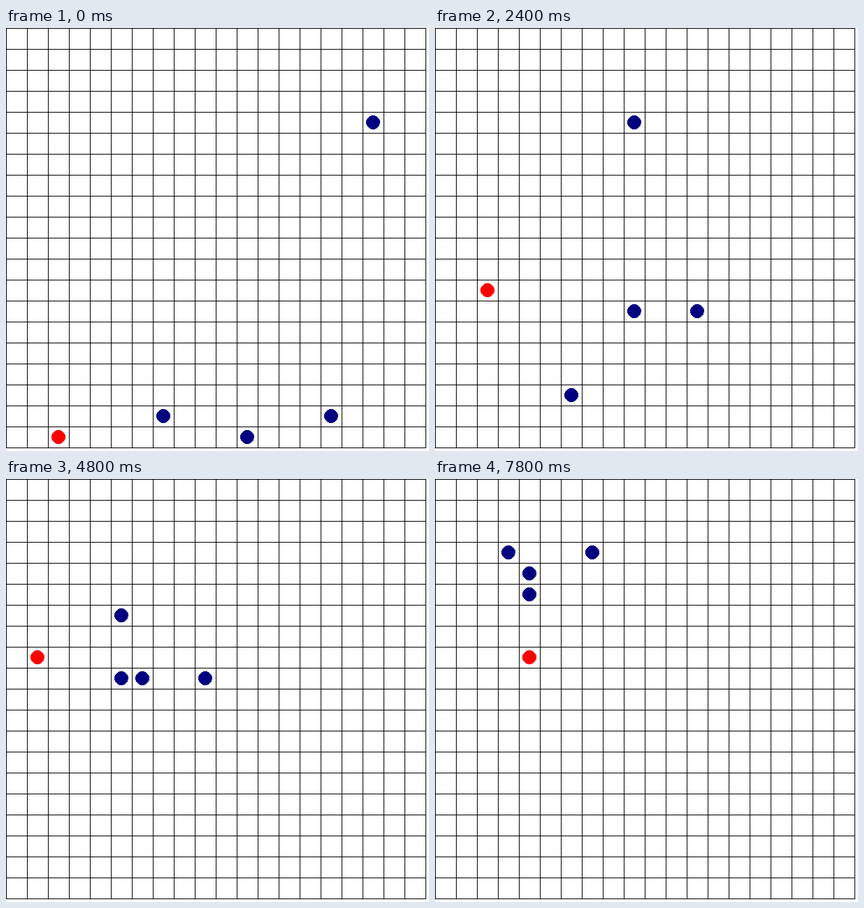
Recreate the animation shown at these times as an HTML page. Size 605 by 605 pixels, loop 8 s.

```html
<!DOCTYPE html>
<html lang="en">
<head>
<meta charset="utf-8">
<title>Grid chase</title>
<style>
  html, body { margin: 0; width: 100%; height: 100%; overflow: hidden; background: #fff; }
  svg { display: block; width: 100vw; height: 100vh; }
</style>
</head>
<body>
<svg viewBox="0 0 605 605" shape-rendering="crispEdges">
  <path id="grid" stroke="#000" fill="none"/>
  <g id="dots"></g>
</svg>
<script>
const CELL = 30, COUNT = 20, STEP = 300, LOOP = 8000;
const MOVES = { L: [-1, 0], R: [1, 0], U: [0, -1], D: [0, 1], '.': [0, 0] };

// Each step is one or more unit moves; the runner can take two at once.
function trail(col, row, steps) {
  const cells = [[col, row]];
  for (const step of steps) {
    for (const move of step) {
      col += MOVES[move][0];
      row += MOVES[move][1];
    }
    cells.push([col, row]);
  }
  return cells;
}

const runner = 'U U U UU U . U . . . . . . U UU UL UU U UU U UR D DD DD DR DR';
const players = [
  { color: '#000080', cells: trail(7, 18, '......ULUUUUUUUUULUUUL....') },
  { color: '#000080', cells: trail(11, 19, 'UUUUULULULULULULUULUUU....') },
  { color: '#000080', cells: trail(15, 18, 'LULULUUUUUUU.LLLLLULUUUUUR') },
  { color: '#000080', cells: trail(17, 4, 'LLLLLLLLLDLDLL..LUUUUL.D..') },
  { color: '#ff0000', cells: trail(2, 19, runner.split(' ')) }
];

let lines = '';
for (let i = 0; i <= COUNT; i++) {
  const p = i * CELL + 0.5;
  lines += `M${p} 0v601M0 ${p}h601`;
}
document.getElementById('grid').setAttribute('d', lines);

const dots = document.getElementById('dots');
for (const player of players) {
  const dot = document.createElementNS('http://www.w3.org/2000/svg', 'circle');
  dot.setAttribute('r', 10);
  dot.setAttribute('fill', player.color);
  player.dot = dots.appendChild(dot);
}

function draw(time) {
  const step = Math.floor((time % LOOP) / STEP);
  for (const { dot, cells } of players) {
    const [col, row] = cells[step];
    dot.setAttribute('cx', (col + 0.5) * CELL);
    dot.setAttribute('cy', (row + 0.5) * CELL);
  }
}

const start = performance.now();
function tick() {
  draw(performance.now() - start);
  requestAnimationFrame(tick);
}
tick();
</script>
</body>
</html>
```
